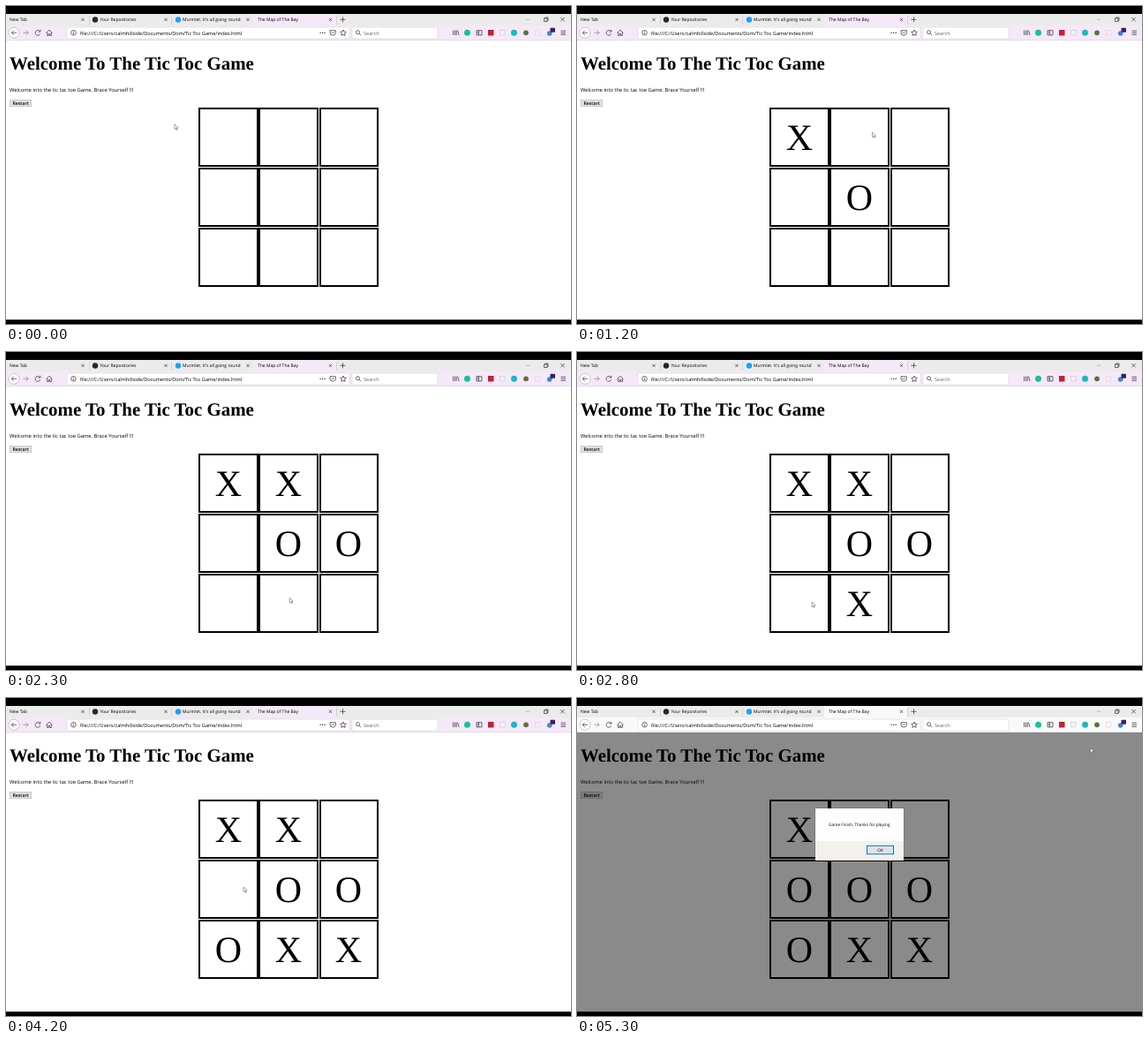
An HTML page that plays this animation: 640 by 360 pixels, repeating every 5400 ms.

```html
<!DOCTYPE html>
<html lang="en">
<head>
<meta charset="utf-8">
<title>Tic Toc Game</title>
<style>
  html, body { margin: 0; width: 100%; height: 100%; overflow: hidden; background: #000; }
  svg { display: block; width: 640px; height: 360px; }
  text { font-family: "Open Sans", sans-serif; font-size: 5px; fill: #000; text-rendering: geometricPrecision; }
  .serif { font-family: "Liberation Serif", serif; }
  .head { font-size: 20.9px; font-weight: bold; }
  .mark { font-size: 42px; text-anchor: middle; }
  .field { font-size: 5.6px; }
  .mid { text-anchor: middle; }
  .line { fill: none; stroke: #444; stroke-width: .8; }
  .chrome { fill: #f5e8f8; }
  .modal .chrome { fill: #f9f9fa; }
  .alert { display: none; }
  .alert text { font-size: 4.7px; }
  .modal .alert { display: inline; }
</style>
</head>
<body>
<svg id="stage" viewBox="0 0 640 360">
  <rect width="640" height="360"/>
  <rect y="9" width="640" height="346" fill="#fff"/>

  <!-- tab strip -->
  <rect y="9" width="640" height="13.5" fill="#ebebeb"/>
  <rect class="chrome" x="280" y="9" width="94" height="14"/>
  <path d="M94.5 11v10M187.5 11v10M374.5 11v10" stroke="#c4c2c6" stroke-width=".6"/>
  <text x="4" y="17.3">New Tab</text>
  <circle cx="101" cy="15.5" r="3.2" fill="#24292e"/>
  <text x="106.5" y="17.3">Your Repositories</text>
  <circle cx="195" cy="15.5" r="3.2" fill="#1da1f2"/>
  <text x="200" y="17.3">Murmlet. It's all going round</text>
  <text x="285" y="17.3">The Map of The Bay</text>
  <g id="closers" class="line"></g>
  <path class="line" d="M378.5 15.3h6M381.5 12.3v6"/>
  <path class="line" d="M589 15.3h4.5" opacity=".35"/>
  <path class="line" d="M609.5 14h3.5v3.5h-3.5zM610.5 14v-1h3.5v3.5h-1M628.3 13l4.4 4.4M632.7 13l-4.4 4.4"/>

  <!-- toolbar -->
  <rect class="chrome" y="22" width="640" height="17"/>
  <path d="M0 38.8h640" stroke="#d0cbd2" stroke-width=".5"/>
  <circle cx="9" cy="30.3" r="6" fill="#fff" stroke="#b5b0b7" stroke-width=".7"/>
  <path class="line" d="M12 30.3H6.3M8.8 27.7l-2.6 2.6l2.6 2.6"/>
  <path class="line" d="M19.5 30.3h5.5M22.6 27.7l2.6 2.6l-2.6 2.6" opacity=".55"/>
  <path class="line" d="M38.5 28.8a2.9 2.9 0 1 0 .3 2.5M38.9 26.8v2.3h-2.3"/>
  <path class="line" d="M45.5 30.5l3.5-3.3l3.5 3.3M46.7 30v3.5h1.6v-2h1.4v2h1.6V30"/>
  <g fill="#fff" stroke="#d2ccd5" stroke-width=".5">
    <rect x="69" y="24" width="320" height="13" rx="1"/>
    <rect x="392" y="24" width="97" height="13" rx="1"/>
  </g>
  <circle class="line" cx="76.5" cy="30.3" r="2.8"/>
  <path class="line" d="M76.5 29.8v2.2M76.5 28.4v.7"/>
  <text class="field" x="84" y="32.5">file:///C:/Users/calmhillside/Documents/Dom/Tic Toc Game/index.html</text>
  <path d="M355.5 30.3h6.5" stroke="#444" stroke-width="1.3" stroke-dasharray="1.3 1.2"/>
  <path class="line" d="M367 27.7h6.4v2.3a3.2 3.2 0 0 1-6.4 0zM368.7 29.3l1.5 1.5l1.5-1.5"/>
  <path class="line" d="M382 27l1 2.2l2.4.2l-1.8 1.6l.6 2.4l-2.2-1.3l-2.2 1.3l.6-2.4l-1.8-1.6l2.4-.2z"/>
  <circle class="line" cx="398.5" cy="29.7" r="2"/>
  <path class="line" d="M400 31.2l2 2"/>
  <text class="field" x="405" y="32.5" style="fill:#666">Search</text>
  <path class="line" d="M506.5 27.5v5.5M508.5 27.5v5.5M510.3 27.5v5.5M511.5 27.7l1.7 5.3"/>
  <circle cx="522.5" cy="30.3" r="3.5" fill="#15c39a"/>
  <path class="line" d="M533 27.7h6v5.2h-6zM535.5 27.7v5.2M533.8 29.3h1M533.8 30.8h1"/>
  <rect x="546" y="27" width="6.5" height="6.5" fill="#c8202f"/>
  <rect x="559.5" y="27.5" width="5.5" height="5.5" fill="#f4f1f5" stroke="#ccc5cf" stroke-width=".6"/>
  <circle cx="575.5" cy="30.3" r="3.5" fill="#13bdbb"/>
  <circle cx="589" cy="30.3" r="2.9" fill="#5d713e"/>
  <rect x="599.5" y="27.5" width="5.5" height="5.5" fill="none" stroke="#ddd5e0" stroke-width=".6"/>
  <circle cx="615.7" cy="31" r="2.8" fill="#3c86d8"/>
  <rect x="616.5" y="24.7" width="5.5" height="5" rx=".8" fill="#37225c"/>
  <path class="line" d="M628.5 28.2h5.5M628.5 30.3h5.5M628.5 32.4h5.5"/>

  <!-- page -->
  <text class="serif head" x="4" y="72">Welcome To The Tic Toc Game</text>
  <text x="4" y="97" style="font-size:5.8px">Welcome into the tic tac toe Game. Brace Yourself !!!</text>
  <rect x="4.3" y="106.3" width="24.5" height="7.5" fill="#e1e1e1" stroke="#adadad" stroke-width=".5"/>
  <text class="mid" x="16.6" y="112" style="font-size:5.2px;font-weight:600">Restart</text>
  <g id="board"></g>

  <!-- alert -->
  <g class="alert">
    <rect y="39" width="640" height="316" opacity=".46"/>
    <rect x="269.5" y="124.5" width="101" height="60.5" opacity=".25"/>
    <rect x="270" y="125" width="100" height="59" fill="#fdfdfd"/>
    <rect x="270" y="162" width="100" height="22" fill="#f4f0eb"/>
    <text x="285" y="144.8">Game Finish, Thanks for playing</text>
    <rect x="328.5" y="167.3" width="30" height="9.4" fill="#e1e1e1" stroke="#0078d7"/>
    <text class="mid" x="343.5" y="173.7">OK</text>
  </g>

  <g id="cursor">
    <path d="M0 0v5.6l1.3-1.2l.9 2l1-.4l-.9-2h1.8z" fill="#fff" stroke="#444" stroke-width=".5"/>
    <circle id="busy" cx="4" cy="0" r="1.6" fill="none" stroke="#2a86d8"/>
  </g>
</svg>
<script>
const LOOP = 5400, STEP = 100, ALERT = 4300, LEAVE = 4900;
const $ = id => document.getElementById(id);

// time, column, row, mark
const moves = [
  [300, 0, 0, 'X'], [800, 1, 1, 'O'], [1300, 1, 0, 'X'], [1700, 2, 1, 'O'],
  [2400, 1, 2, 'X'], [3100, 0, 2, 'O'], [3700, 2, 2, 'X'], [ALERT, 0, 1, 'O']
];

// time, x, y of the pointer tip
const path = [
  [0, 191, 134], [300, 242, 150], [600, 308, 242], [800, 318, 222],
  [1200, 334.5, 143], [1300, 326, 147], [1700, 372, 209], [1800, 373.5, 207],
  [2400, 317, 284], [2800, 266, 283], [3100, 252, 285], [3700, 385, 285],
  [4200, 269, 214], [ALERT, 269, 216.5], [LEAVE, 269, 216.5],
  [5300, 581.5, 56.5]
];

function add(parent, tag, attrs, text = '') {
  const el = document.createElementNS('http://www.w3.org/2000/svg', tag);
  for (const key in attrs) el.setAttribute(key, attrs[key]);
  el.textContent = text;
  return parent.appendChild(el);
}

for (const x of [87, 181, 274, 367.5])
  add($('closers'), 'path', { d: `M${x - 1.6} 13.8l3.2 3.2m0-3.2l-3.2 3.2` });

// Cell edges snap to whole pixels, as in page layout.
for (let i = 0; i < 9; i++) {
  const x = 218.2 + 68.2 * (i % 3), left = Math.round(x), right = Math.round(x + 67.4);
  add($('board'), 'rect', {
    x: left + 1, y: 116 + 68 * Math.floor(i / 3),
    width: right - left - 2, height: 65, fill: 'none', stroke: '#000', 'stroke-width': 2
  });
}

const marks = moves.map(([, col, row, mark]) =>
  add($('board'), 'text', { class: 'serif mark', x: 252 + 68 * col, y: 163 + 68 * row }, mark));

function pointer(t) {
  const i = path.findIndex(p => p[0] > t);
  if (i < 0) return path[path.length - 1].slice(1);
  const [t0, x0, y0] = path[i - 1], [t1, x1, y1] = path[i];
  const k = (t - t0) / (t1 - t0), e = k * k * (3 - 2 * k);
  return [x0 + (x1 - x0) * e, y0 + (y1 - y0) * e];
}

function draw(now) {
  const t = Math.floor((now % LOOP) / STEP) * STEP;
  marks.forEach((el, i) => el.setAttribute('visibility', t >= moves[i][0] ? 'visible' : 'hidden'));
  $('stage').classList.toggle('modal', t >= ALERT);
  $('busy').setAttribute('visibility', t >= ALERT && t < LEAVE ? 'visible' : 'hidden');
  $('cursor').setAttribute('transform', `translate(${pointer(t)})`);
}

const start = performance.now();
function tick() {
  draw(performance.now() - start);
  requestAnimationFrame(tick);
}
tick();
</script>
</body>
</html>
```
